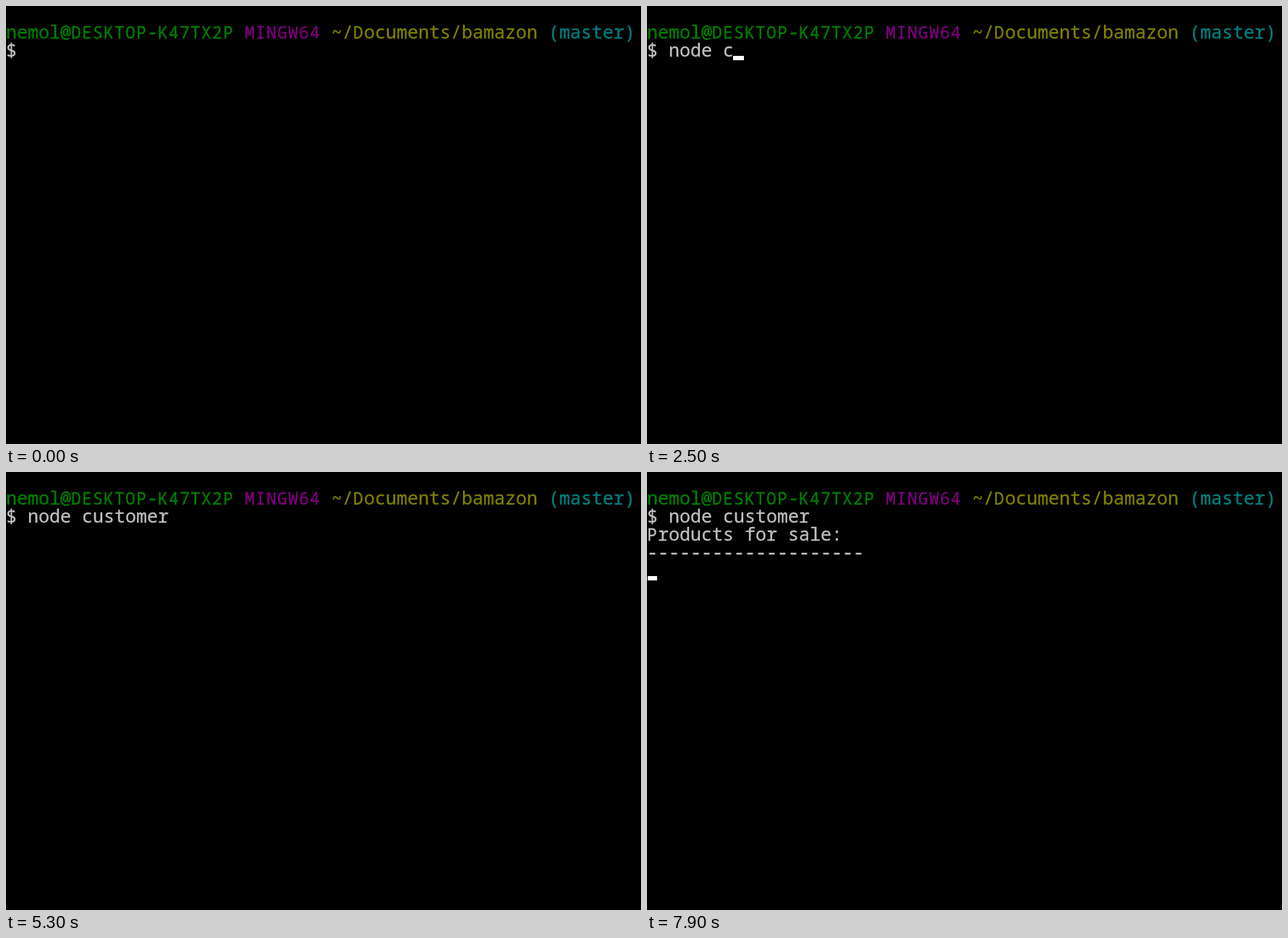
Recreate the animation shown at these times as an HTML page. Size 878 by 606 pixels, loop 8 s.

```html
<!DOCTYPE html>
<html lang="en">
<head>
<meta charset="utf-8">
<title>Terminal session</title>
<style>
  html, body { margin: 0; width: 100%; height: 100%; overflow: hidden; background: #000; }
  svg { display: block; }
  text { font: 25px "Noto Sans Mono", monospace; color: #c0c0c0; white-space: pre; }
  text, tspan { fill: currentColor; stroke: currentColor; stroke-width: 0.3px; }
  .caps { font-size: 23px; letter-spacing: 1.2px; } /* shorter capitals on the same 15px grid */
  .user { color: #008000; }
  .system { color: #800080; }
  .path { color: #808000; }
  .branch { color: #008080; }
</style>
</head>
<body>
<svg width="878" height="606" viewBox="0 0 878 606">
  <text y="45"><tspan class="user">nemol@DESKTOP-K47TX2P</tspan> <tspan class="system">MINGW64</tspan> <tspan class="path">~/Documents/bamazon</tspan> <tspan class="branch">(master)</tspan></text>
  <text y="70" id="command"></text>
  <g id="output">
    <text y="95">Products for sale:</text>
    <text y="120">--------------------</text>
  </g>
  <rect id="cursor" height="6" fill="#fff"/>
</svg>
<script>
const LOOP = 8000, CELL = 15, ROW = 25;
const COMMAND = "node customer";
const KEY_TIMES = [1500, 1600, 1700, 1900, 2000, 2500, 2700, 2900, 3000, 3400, 3600, 3800, 3900];
const ENTER_TIME = 6200, OUTPUT_TIME = 7900;
// The cursor starts hidden and flips at each of these times.
const BLINK_TIMES = [500, 1000, 1500, 2400, 2500, 4300, 4800, 5300, 5800, 6200, 6600, 6700, 7200, 7700, 7900];

const [command, output, cursor] = ["command", "output", "cursor"].map(id => document.getElementById(id));
const countPassed = (times, t) => times.filter(time => time <= t).length;

function wrapCapitals(node) {
  if (node.nodeType !== Node.TEXT_NODE) {
    [...node.childNodes].forEach(wrapCapitals);
    return;
  }
  const parts = node.data.split(/([A-Z0-9]+)/).filter(Boolean).map(part => {
    if (!/^[A-Z0-9]/.test(part)) return part;
    const span = document.createElementNS("http://www.w3.org/2000/svg", "tspan");
    span.setAttribute("class", "caps");
    span.textContent = part;
    return span;
  });
  node.replaceWith(...parts);
}

function placeCursor(column, row) {
  cursor.setAttribute("x", column ? column * CELL - 1 : 1);
  cursor.setAttribute("width", column ? CELL : CELL - 2);
  cursor.setAttribute("y", 69 + row * ROW);
}

function draw(t) {
  const typed = countPassed(KEY_TIMES, t);
  command.textContent = "$ " + COMMAND.slice(0, typed);
  output.style.display = t >= OUTPUT_TIME ? "" : "none";
  cursor.style.display = countPassed(BLINK_TIMES, t) % 2 ? "" : "none";
  if (t < ENTER_TIME) placeCursor(2 + typed, 0);
  else placeCursor(0, t < OUTPUT_TIME ? 1 : 3);
}

function tick() {
  draw(performance.now() % LOOP);
  requestAnimationFrame(tick);
}

document.querySelectorAll("text").forEach(wrapCapitals);
tick();
</script>
</body>
</html>
```
